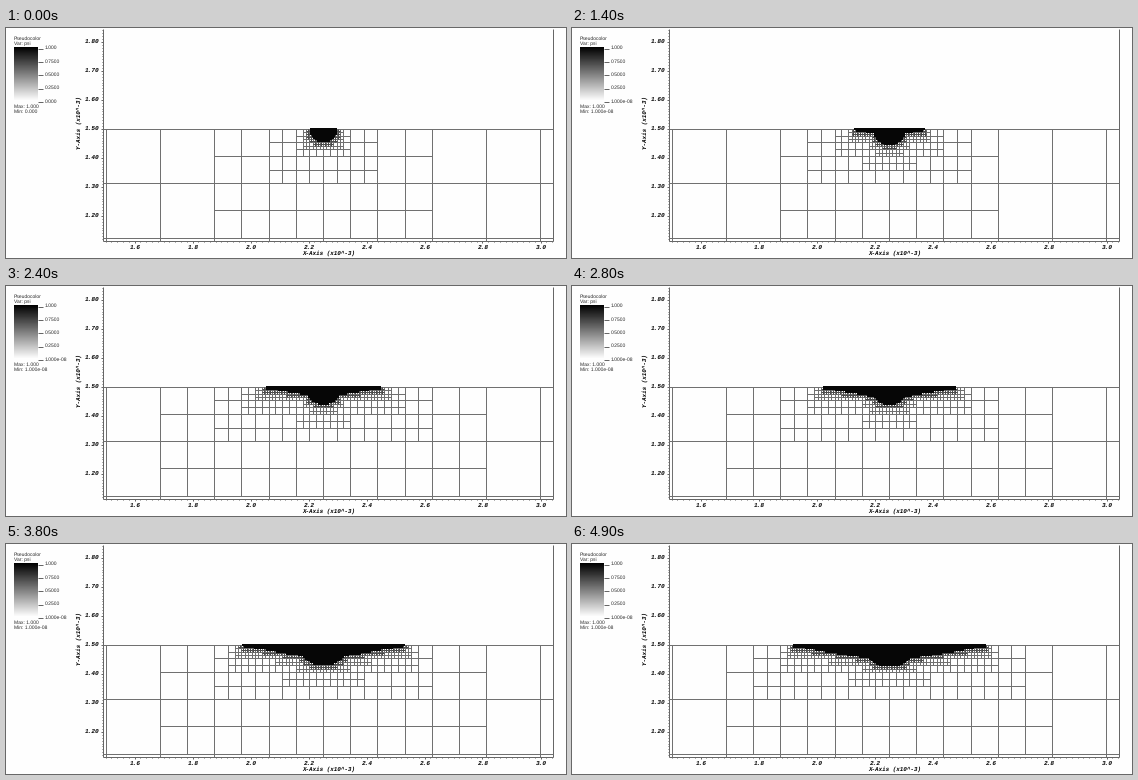
Recreate the animation shown at these times as a matplotlib script. Size 560 by 230 pixels, loop 5000 ms.

```python
import numpy as np
import matplotlib.pyplot as plt
from matplotlib.animation import FuncAnimation
from matplotlib.collections import LineCollection, PolyCollection

plt.rcParams["text.hinting"] = "none"

W, H, DPI = 560, 230, 80
PX = 72 / DPI                      # points per pixel
FRAMES, STEP_MS = 50, 100
START = 5                          # growth begins at this step
PAUSES = {39, 42, 45}              # steps on which the picture holds

LEFT, RIGHT, BOTTOM = 97.5, 547.5, 212.5
CX, TOP = 317.5, 100.4             # mesh centre and surface, pixels
BASE, COLS, ROWS = 54.35, 8, 2     # coarsest cells
FINE = 5                           # level of the finest refined cells
SCALE = 290                        # pixels per axis unit
INK, FRAME, MESH = "#2a2a2a", "#666666", "#707070"
FRINGE, BLACK, PAPER = "#4a4a4a", "#060606", "#fefefe"

# Growth of the dark region: seconds, then pixels
WIDTH = [(0.4, 14), (1.4, 35), (2.0, 49), (2.8, 66), (3.4, 75), (4.3, 88), (4.9, 97)]
BOWL_DEPTH = [(0.4, 14.3), (0.9, 16.5), (1.4, 17.2), (2.8, 19), (3.8, 21.2), (4.9, 22.8)]
BOWL_WIDTH = [(0.4, 14.3), (1.4, 17), (2.8, 19), (3.4, 21), (3.8, 25.5), (4.9, 26.5)]

fig = plt.figure(figsize=(W / DPI, H / DPI), dpi=DPI, facecolor=PAPER)
ax = fig.add_axes([0, 0, 1, 1])
ax.set_xlim(0, W)
ax.set_ylim(H, 0)
ax.axis("off")


def px(v):
    return CX + (v - 2.25) * SCALE


def py(v):
    return TOP + (1.5 - v) * SCALE


def crisp(segs):
    """Offset so that snapping picks the pixel containing each line."""
    return np.asarray(segs, float) + (-0.5, 0.5)


def add_lines(segs, color):
    lines = LineCollection(crisp(segs) if segs else [], colors=color,
                           linewidths=PX)
    ax.add_collection(lines)
    return lines


def mono(x, y, s, size=6.1, **kw):
    ax.text(x, y, s, family="Liberation Mono", weight="bold", style="italic",
            size=size * PX, va="center", color="black", **kw)


def sans(x, y, s):
    return ax.text(x, y, s, family="Liberation Sans", size=5 * PX,
                   va="center", color=INK)


def draw_axes():
    segs = [[(LEFT, 0), (LEFT, BOTTOM)], [(RIGHT, 0), (RIGHT, BOTTOM)],
            [(LEFT, BOTTOM), (RIGHT, BOTTOM)]]
    for k in range(75, 153):
        x, major = px(k / 50), k % 10 == 0
        segs.append([(x, BOTTOM), (x, BOTTOM + (2 if major else 1))])
        if major:
            mono(x, 219.2, f"{k / 50:.1f}", ha="center")
    for k in range(112, 185):
        y, major = py(k / 100), k % 10 == 0
        segs.append([(LEFT - (2 if major else 1), y), (LEFT, y)])
        if major:
            mono(94, y - 0.4, f"{k / 100:.2f}", ha="right")
    add_lines(segs, FRAME)
    mono(323, 225.3, "X-Axis (x10^-3)", size=5.9, ha="center")
    mono(73.4, 95, "Y-Axis (x10^-3)", size=5.9, ha="center", rotation=90)


def draw_legend():
    sans(8, 10.8, "Pseudocolor")
    sans(8, 15.7, "Var: psi")
    ax.imshow(np.linspace(0, 1, 128)[:, None], cmap="gray", vmin=0, vmax=1,
              extent=(8, 32, 73.5, 20), aspect="auto", interpolation="bilinear")
    ax.set_xlim(0, W)
    ax.set_ylim(H, 0)
    ys = np.linspace(20, 73.5, 5)
    add_lines([[(32, y), (37, y)] for y in ys], FRAME)
    for y, s in zip(ys, ("1.000", "0.7500", "0.5000", "0.2500")):
        sans(38.5, y, s)
    sans(8, 78.5, "Max: 1.000")
    return sans(38.5, ys[-1], ""), sans(8, 83.5, "")


def draw_base_mesh():
    segs = [[(LEFT, y), (RIGHT, y)] for y in TOP + BASE * np.arange(ROWS + 1)]
    for x in CX + BASE * (np.arange(COLS + 1) - COLS / 2):
        segs.append([(x, TOP), (x, BOTTOM)])
    add_lines(segs, MESH)


def centres(level):
    """Cell size and the x, y centres (from the surface middle) at a level."""
    size = BASE / 2 ** level
    x = (np.arange(COLS * 2 ** level) + 0.5) * size - COLS * BASE / 2
    y = (np.arange(ROWS * 2 ** level) + 0.5) * size
    return size, x, y


def at(knots, t):
    return np.interp(t, *zip(*knots))


def depth(x, t):
    inset = at(WIDTH, t) - np.abs(x)
    wing = np.where(inset > 0, np.minimum(2.5 + 0.155 * inset, 2 + inset), 0)
    bowl = np.sqrt(np.clip(1 - (x / at(BOWL_WIDTH, t)) ** 2, 0, 1))
    return np.maximum(wing, at(BOWL_DEPTH, t) * bowl)


def coarsen(cells):
    """Parents that must split so neighbours differ by one level at most."""
    r, c = cells.shape
    p = np.pad(cells, 1)
    near = np.zeros_like(cells)
    for i in range(3):
        for j in range(3):
            near |= p[i:i + r, j:j + c]
    return near.reshape(r // 2, 2, c // 2, 2).any(axis=(1, 3))


def refined(cells, level):
    size, x, y = centres(level)
    rows, cols = np.nonzero(cells)
    return size / 2, CX + x[cols], TOP + y[rows]


def crosses(h, x, y):
    across = np.stack([x - h, y, x + h, y], 1)
    down = np.stack([x, y - h, x, y + h], 1)
    return np.concatenate([across, down]).reshape(-1, 2, 2)


def squares(h, x, y):
    return np.stack([x - h, y - h, x + h, y - h,
                     x + h, y + h, x - h, y + h], 1).reshape(-1, 4, 2)


draw_axes()
draw_base_mesh()
low_label, min_label = draw_legend()
mesh = add_lines([], MESH)
fringe = add_lines([], FRINGE)
core = PolyCollection([], facecolors=BLACK, edgecolors="none", zorder=3)
core.set_antialiased(False)
ax.add_collection(core)


def update(i):
    step = i - 1 if i in PAUSES else i
    t = max(step, START - 1) / 10
    low = "0.000" if i < START else "1.000e-08"
    low_label.set_text(low)
    min_label.set_text("Min: " + low)

    _, x, y = centres(FINE)
    cells = y[:, None] < depth(x, t)[None, :]
    core.set_verts(squares(*refined(cells, FINE)))
    segs = []
    for level in range(FINE - 1, -1, -1):
        cells = coarsen(cells)
        segs.append(crosses(*refined(cells, level)))
    fringe.set_segments(crisp(segs[0]))
    mesh.set_segments(crisp(np.concatenate(segs[1:])))
    return mesh, fringe, core, low_label, min_label


anim = FuncAnimation(fig, update, frames=FRAMES, interval=STEP_MS,
                     repeat=True, repeat_delay=0, blit=False)
plt.show()
```
